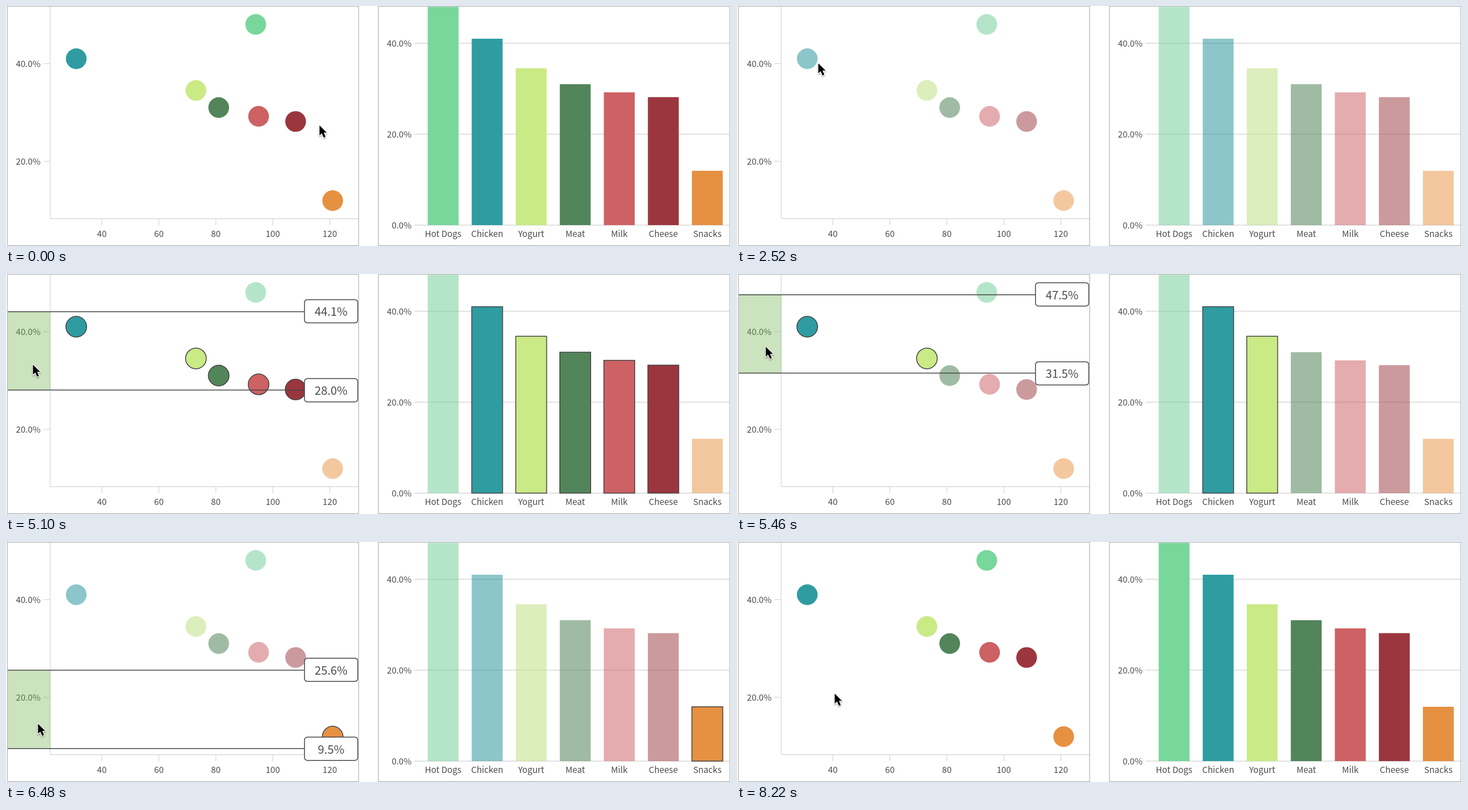
An HTML page that plays this animation: 1280 px wide and 425 px high, repeating every 8.28 s.

```html
<!DOCTYPE html>
<html lang="en">
<head>
<meta charset="utf-8">
<title>Linked charts</title>
<style>
  html, body { margin: 0; width: 100%; height: 100%; overflow: hidden; background: #fff; }
  svg { display: block; width: 1280px; height: 425px; }
  text {
    font-family: "Noto Sans CJK JP", "Noto Sans CJK SC", "Noto Sans CJK", "Open Sans", sans-serif;
    font-size: 15.2px; fill: #4b4b4b;
  }
  .mid { text-anchor: middle; }
  .end { text-anchor: end; }
  .axis { stroke: #d8d8d8; stroke-width: 1.3; fill: none; }
  .frame { stroke: #b9b9b9; stroke-width: 1.4; fill: none; }
  .limit { stroke: #444; stroke-width: 1.5; }
  .tag { fill: #fff; stroke: #444; stroke-width: 1.5; }
  .value { font-size: 20.3px; text-anchor: middle; }
</style>
</head>
<body>
<svg id="stage" viewBox="0 0 1280 425">
  <defs>
    <clipPath id="panel"><rect x="2" y="0" width="621" height="425"/></clipPath>
    <filter id="shadow" x="-60%" y="-40%" width="240%" height="200%">
      <feDropShadow dx="0" dy="1.6" stdDeviation="1.3" flood-color="#000" flood-opacity=".4"/>
    </filter>
  </defs>
</svg>
<script>
const LOOP = 8280, STEP = 60;
const DIM_AT = 365, DRAG_AT = 3600, MOVE_AT = 5100, REST_AT = 7300, CLEAR_AT = 7980;
const LAG = 13, GRIP = 93.3, SPAN = 138.75, TOP = 66.7, RADIUS = 18.3;

// name, x value, percentage, colour, muted colour
const foods = [
  ["Hot Dogs", 94, 48.03, "#78d79b", "#78d09b"],
  ["Chicken", 31, 41, "#2f9ca1", "#2e979f"],
  ["Yogurt", 73, 34.5, "#caea85", "#c1e087"],
  ["Meat", 81, 31, "#52855a", "#52835a"],
  ["Milk", 95, 29.2, "#cd6163", "#ce686c"],
  ["Cheese", 108, 28.15, "#9b363e", "#a0474d"],
  ["Snacks", 121, 11.95, "#e69042", "#eb9b50"]
].map(([name, x, share, color, muted]) => ({ name, x, share, color, muted }));

// cursor stops: time, x, y
const stops = [
  [0, 553, 211], [150, 553, 211], [560, 511, 204], [900, 440, 195], [1080, 429, 195],
  [1400, 376, 178], [1750, 335, 149], [2520, 143, 101], [2760, 126, 94], [3000, 122, 93],
  [3450, 47, TOP], [DRAG_AT, 47, TOP], [4450, 47, TOP + SPAN], [4900, 47, 160], [5150, 47, 160],
  [5756, 53.3, 98.5], [6506, 56, 322], [6850, 53, 140], [7200, 50, 326.1], [7450, 50, 326.1],
  [7900, 172, 268], [LOOP, 172, 268]
];

const stage = document.getElementById("stage");
const px = v => 169.3 + (v - 40) * 5.03;
const py = v => 102 - (v - 40) * 8.65;
const share = y => 40 - (y - 102) / 8.65;
const barY = v => 388 - v * 8.05;

function set(node, attrs) {
  for (const key in attrs) node.setAttribute(key, attrs[key]);
  return node;
}
function add(tag, attrs, parent = stage, text) {
  const node = set(document.createElementNS("http://www.w3.org/2000/svg", tag), attrs);
  if (text) node.textContent = text;
  return parent.appendChild(node);
}
const line = (x1, y1, x2, y2, cls = "axis", parent = stage) =>
  add("line", { x1, y1, x2, y2, class: cls }, parent);
const label = (x, y, text, cls) => add("text", { x, y, class: cls }, stage, text);

// Scatter axes
line(78, 1, 78, 376);
line(78, 376.5, 622, 376.5);
for (const v of [20, 40]) {
  line(66, py(v), 78, py(v));
  label(61, py(v) + 5.8, v.toFixed(1) + "%", "end");
}
for (let v = 40; v <= 120; v += 20) {
  line(px(v), 376.5, px(v), 388);
  label(px(v), 409, v, "mid");
}

// Bar axes
for (const v of [0, 20, 40]) {
  line(721, barY(v), 1278, barY(v));
  label(716, barY(v) + 5.8, v.toFixed(1) + "%", "end");
}

const band = add("rect", { x: 3, width: 75.5, fill: "#77b654", "fill-opacity": .38 });
const plot = add("g", { "clip-path": "url(#panel)" });

foods.forEach((food, i) => {
  const x = 744.5 + i * 77.75, y = Math.max(1, barY(food.share));
  food.cx = px(food.x);
  food.cy = py(food.share);
  food.dot = add("circle", { cx: food.cx, cy: food.cy, r: RADIUS }, plot);
  food.bar = add("rect", { x, y, width: 54.5, height: 388 - y });
  label(x + 27.25, 409, food.name, "mid");
});

const brush = add("g", {}, plot);
const limits = [-21.3, -20.2].map(shift => {
  const g = add("g", {}, brush);
  line(3, 0, 527, 0, "limit", g);
  add("rect", { x: 527, y: shift, width: 94, height: 41.2, rx: 5, class: "tag" }, g);
  const text = add("text", { x: 574, y: shift + 29, class: "value" }, g);
  return { g, text };
});

add("rect", { x: 2.5, y: .5, width: 620, height: 423.8, class: "frame" });
add("rect", { x: 657.5, y: .5, width: 620.5, height: 423.8, class: "frame" });

const cursor = add("g", { filter: "url(#shadow)" });
add("path", {
  d: "M.5 .5V18.3L4.6 14.5L7.9 22L11.2 20.5L8 13.3H13.3Z",
  stroke: "#fff", "stroke-width": 2.4, "stroke-linejoin": "round", "paint-order": "stroke"
}, cursor);

function cursorAt(t) {
  const i = Math.max(1, stops.findIndex(s => s[0] > t));
  const [t0, x0, y0] = stops[i - 1], [t1, x1, y1] = stops[i];
  const p = (t - t0) / (t1 - t0), e = p * p * (3 - 2 * p);
  return { x: x0 + (x1 - x0) * e, y: y0 + (y1 - y0) * e };
}

function brushAt(t) {
  if (t < DRAG_AT || t >= CLEAR_AT) return null;
  if (t < MOVE_AT) return [TOP, t < 4450 ? cursorAt(t).y : TOP + SPAN];
  const top = cursorAt(Math.min(t, REST_AT) - LAG).y - GRIP;
  return [top, top + SPAN];
}

function paint(food, lit, dim) {
  const look = {
    fill: dim && !lit ? food.muted : food.color,
    "fill-opacity": dim && !lit ? .55 : 1,
    stroke: lit ? "#444" : "none",
    "stroke-width": 1.5
  };
  set(food.dot, look);
  set(food.bar, look);
}

function draw(t) {
  const tip = cursorAt(t), range = brushAt(t);
  const dim = t >= DIM_AT && t < CLEAR_AT;
  for (const food of foods) {
    const hit = range
      ? food.cy >= range[0] && food.cy <= range[1]
      : Math.hypot(tip.x - food.cx, tip.y - food.cy) < RADIUS;
    paint(food, dim && hit, dim);
  }
  const display = range ? "inline" : "none";
  set(brush, { display });
  set(band, { display });
  if (range) {
    set(band, { y: range[0], height: Math.max(0, range[1] - range[0]) });
    limits.forEach(({ g, text }, i) => {
      set(g, { transform: `translate(0 ${range[i]})` });
      text.textContent = share(range[i]).toFixed(1) + "%";
    });
  }
  set(cursor, { transform: `translate(${tip.x} ${tip.y})` });
}

const start = performance.now();
function tick() {
  const t = (performance.now() - start) % LOOP;
  draw(Math.floor(t / STEP) * STEP);
  requestAnimationFrame(tick);
}
tick();
</script>
</body>
</html>
```
